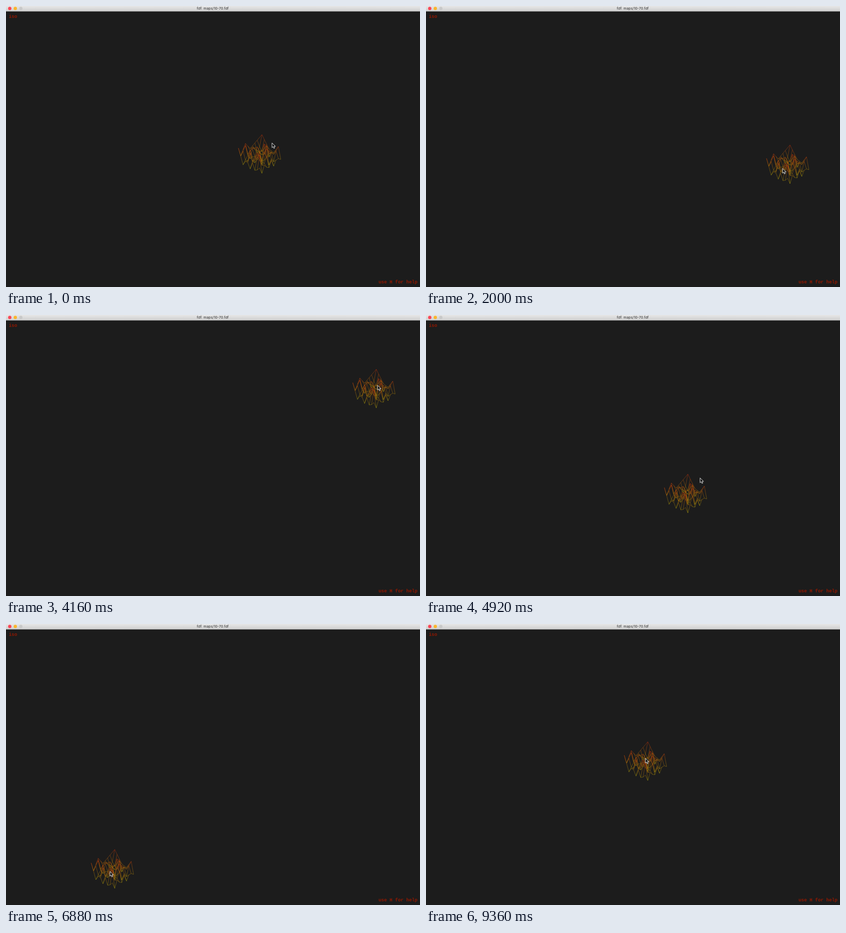
An HTML page with a canvas that plays this animation: 800x544 px, repeating every 9.4 s.

```html
<!DOCTYPE html>
<html>
<head>
<meta charset="utf-8">
<title>fdf</title>
<style>
  html, body { margin: 0; width: 100%; height: 100%; overflow: hidden; background: #1c1c1c; }
  canvas { display: block; }
</style>
</head>
<body>
<canvas id="stage" width="800" height="544"></canvas>
<script>
const ctx = document.getElementById('stage').getContext('2d');
const LOOP = 9400, STEP = 40, BAR = 11;

// Turning points of the circling pointer: time in ms, x, y
const path = [
  [-40, 491, 280], [0, 514, 265], [320, 430, 55], [660, 220, 85], [960, 402, 111],
  [1000, 452, 114], [1320, 670, 60], [1880, 716, 272], [2440, 500, 438], [2960, 191, 389],
  [3000, 168, 385], [3340, 46, 210], [3800, 452, 140], [4120, 712, 136], [4160, 718, 136],
  [4560, 700, 470], [4760, 460, 400], [5220, 710, 210], [5640, 486, 516], [5680, 436, 546],
  [5760, 291, 515], [6060, 35, 220], [6400, 320, 80], [6900, 200, 480], [7300, 310, 50],
  [7740, 380, 480], [8080, 433, 236], [8120, 433, 214], [8580, 316, 280], [8980, 527, 280],
  [9320, 425, 259], [9360, 424, 260]
];

function slope(i, axis) {
  const a = path[Math.max(i - 1, 0)], b = path[Math.min(i + 1, path.length - 1)];
  return (b[axis] - a[axis]) / (b[0] - a[0]);
}

// Smooth cubic curve through the turning points
function pointerAt(time) {
  let i = 0;
  while (i < path.length - 2 && path[i + 1][0] <= time) i++;
  const a = path[i], b = path[i + 1], span = b[0] - a[0];
  const u = (time - a[0]) / span, v = 1 - u;
  return [1, 2].map(k =>
    v * v * (1 + 2 * u) * a[k] + u * u * (3 - 2 * u) * b[k] +
    span * u * v * (v * slope(i, k) - u * slope(i + 1, k)));
}

// Isometric height field; d = col - row is the screen column
const SIZE = 10, DX = 4.55, DY = 2.63, BASE = 30.3, PEAK = 34;
const ridge = [[-9, 26], [-8, 41], [-6, 17], [-4, 27], [1, 0], [4, 28], [6, 35], [8, 23], [9, 48]];

function ridgeAt(d) {
  const i = Math.max(ridge.findIndex(point => point[0] >= d), 1);
  const [d0, y0] = ridge[i - 1], [d1, y1] = ridge[i];
  return y0 + (y1 - y0) * (d - d0) / (d1 - d0);
}

// Lower rim: front row with evenly repeating dips
function rimAt(d) {
  const height = 7.5 - 7.5 * Math.cos(2 * Math.PI * (d - 1) / 2.6);
  return BASE + DY * (18 - Math.abs(d)) - height;
}

let seed = 70;
function random() {
  seed = (seed * 16807) % 2147483647;
  return seed / 2147483647;
}

const nodes = [];
for (let row = 0; row < SIZE; row++) {
  for (let col = 0; col < SIZE; col++) {
    const d = col - row, flat = BASE + DY * (col + row);
    const top = ridgeAt(d), bottom = rimAt(d);
    let y = Math.min(Math.max(flat - PEAK * random(), top + 3), bottom - 3);
    if (row === 0 || col === 0) y = top;
    else if (row === SIZE - 1 || col === SIZE - 1) y = bottom;
    nodes.push({ x: 41 + DX * d, y, height: Math.min(Math.max((flat - y) / PEAK, 0), 1) });
  }
}

function heightColor(h) {
  return `rgb(${175 + 20 * h}, ${165 - 125 * h}, 8)`;
}

function edge(a, b) {
  const paint = ctx.createLinearGradient(a.x, a.y, b.x, b.y);
  paint.addColorStop(0, heightColor(a.height));
  paint.addColorStop(1, heightColor(b.height));
  ctx.strokeStyle = paint;
  ctx.beginPath();
  ctx.moveTo(a.x, a.y);
  ctx.lineTo(b.x, b.y);
  ctx.stroke();
}

function drawMesh(x, y) {
  ctx.save();
  ctx.translate(x, y);
  ctx.globalAlpha = 0.75;
  ctx.lineWidth = 0.6;
  nodes.forEach((node, i) => {
    if (i % SIZE < SIZE - 1) edge(node, nodes[i + 1]);
    if (i + SIZE < nodes.length) edge(node, nodes[i + SIZE]);
  });
  ctx.restore();
}

function text(label, x, y, font, color, align) {
  ctx.font = font;
  ctx.fillStyle = color;
  ctx.textAlign = align;
  ctx.fillText(label, x, y);
}

function drawWindow() {
  const bar = ctx.createLinearGradient(0, 0, 0, BAR);
  bar.addColorStop(0, '#e6e6e6');
  bar.addColorStop(1, '#cdcdcd');
  ctx.fillStyle = bar;
  ctx.fillRect(0, 0, 800, BAR - 0.5);
  ['#fb4557', '#fbb52c', '#c9c9c9'].forEach((color, i) => {
    ctx.fillStyle = color;
    ctx.beginPath();
    ctx.arc(7.3 + 10.65 * i, 4.8, 3.2, 0, 2 * Math.PI);
    ctx.fill();
  });
  text('fdf: maps/10-70.fdf', 399.5, 7.4, '6.8px Inter, sans-serif', '#333', 'center');
  const mono = 'bold 8.95px "Liberation Mono", monospace';
  text('iso', 5.5, 22.5, mono, '#921800', 'left');
  text('use H for help', 795, 537, mono, '#921800', 'right');
}

const arrow = new Path2D('M0 0V9.2L2.1 7.3L3.6 10.6L5.2 9.9L3.8 6.7H6.6Z');
function drawPointer(x, y) {
  ctx.save();
  ctx.translate(x, y);
  ctx.fillStyle = '#111';
  ctx.strokeStyle = '#eee';
  ctx.lineWidth = 0.9;
  ctx.fill(arrow);
  ctx.stroke(arrow);
  ctx.restore();
}

function draw() {
  const time = Math.floor(performance.now() % LOOP / STEP) * STEP;
  const [x, y] = pointerAt(time);
  // The mesh trails the pointer by one step
  const [meshX, meshY] = pointerAt(time - STEP);
  ctx.fillStyle = '#1c1c1c';
  ctx.fillRect(0, 0, 800, 544);
  drawMesh(meshX - 42, meshY - 31);
  drawWindow();
  drawPointer(x, y);
  requestAnimationFrame(draw);
}
draw();
</script>
</body>
</html>
```
